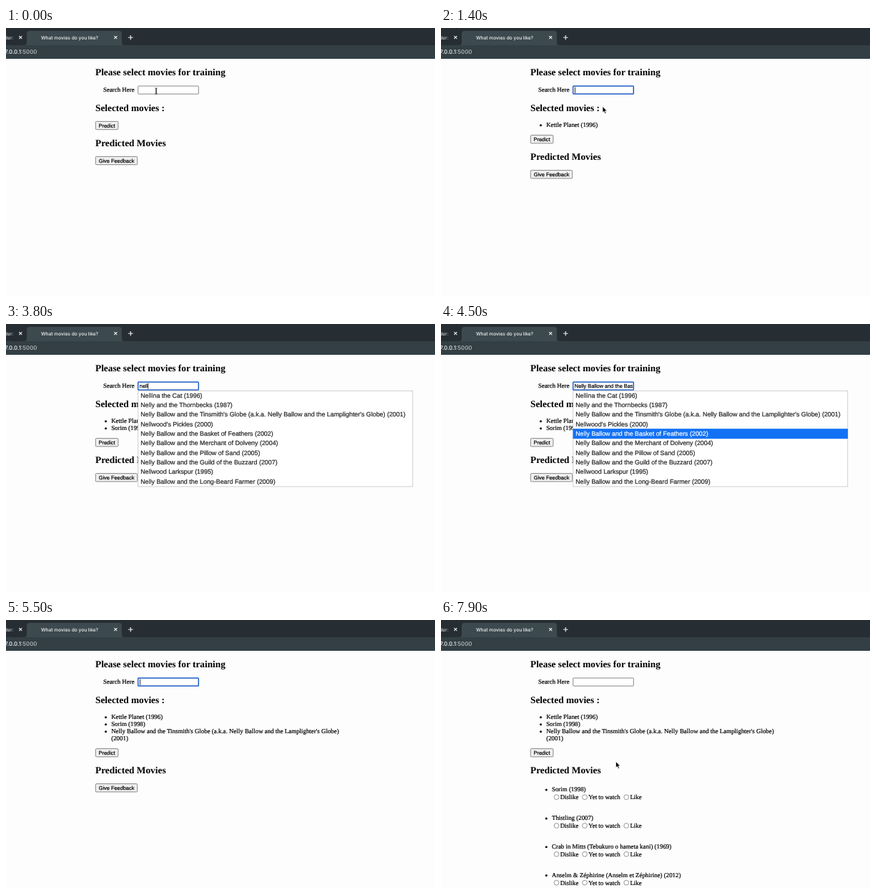
Animation, 600 px wide and 374 px high, one loop 8 s. Source, as an HTML page:

```html
<!DOCTYPE html>
<html lang="en">
<head>
<meta charset="utf-8">
<title>What movies do you like?</title>
<style>
  html, body { margin: 0; width: 100%; height: 100%; overflow: hidden; background: #fefdfe; }
  svg { display: block; width: 600px; height: 374px; text-rendering: geometricPrecision; }
  text { white-space: pre; fill: #000; stroke: #000; stroke-width: .2px; }
  .ui { font: 500 6.6px Inter, sans-serif; fill: #f4f6f6; stroke: none; }
  .url { font-size: 7.9px; }
  .h2 { font: bold 13.33px "Liberation Serif", serif; stroke: none; }
  .p { font: 8.89px "Liberation Serif", serif; }
  .field, .btn { font: 7.4px "Liberation Sans", sans-serif; }
  .btn { text-anchor: middle; }
  .row { font: 8.89px "Liberation Sans", sans-serif; fill: #222; stroke: #222; }
  .row.hot { fill: #fff; stroke: #fff; }
</style>
</head>
<body>
<svg viewBox="0 0 600 374">
  <clipPath id="clip"><rect x="186" y="82" width="82" height="10"/></clipPath>
  <rect width="600" height="374" fill="#fefdfe"/>
  <rect width="600" height="24" fill="#262e33"/>
  <path d="M26 24Q29 23 29 20V8Q29 4 33 4H158Q162 4 162 8V20Q162 23 165 24Z" fill="#3c494f"/>
  <rect y="24" width="600" height="19" fill="#333f44"/>
  <text class="ui" x="10.5" y="15.6" text-anchor="end" fill-opacity=".8">der:</text>
  <text class="ui" x="49" y="15.6">What movies do you like?</text>
  <path d="M18.3 11.2l4 4m0-4l-4 4M151.3 11.2l4 4m0-4l-4 4M171 13.3h6.6m-3.3-3.3v6.6" stroke="#eef1f1" stroke-width="1.1" fill="none"/>
  <text class="ui url" x="43.4" y="35.6" text-anchor="end">127.0.0.1<tspan fill="#b9c0c3">:5000</tspan></text>
  <text class="h2" x="125" y="66.4">Please select movies for training</text>
  <text class="p" x="136" y="89.2">Search Here</text>
  <text class="h2" x="125" y="115.8">Selected movies :</text>
  <g id="page"></g>
</svg>
<script>
const LOOP = 8000, STEP = 100;
const page = document.getElementById("page");
const pen = document.createElement("canvas").getContext("2d");
pen.font = '7.4px "Liberation Sans", sans-serif';

const globe = "Nelly Ballow and the Tinsmith's Globe (a.k.a. Nelly Ballow and the Lamplighter's Globe)";
const menus = {
  kettle: { width: 131, rows: [
    "Kettle Moon (1989)", "Kettle Planet (1996)", "Kettleby Tower (2001)", "The Last Kettle (1958)",
    "Kettle and Crumb (1977)", "The Kettle on the Hillock (1974)", "Kettledown (2008)",
    "Two Kettles Later (1993)", "My Uncle's Kettle (1985)", "Kettlefoot (2011)"] },
  sorim: { width: 177, rows: [
    "Sorim (1998)", "Sorim II (2004)", "Mark Sorimer: Off To Lunch (2012)",
    "Mark Sorimer: The Rooftop Guest (2015)"] },
  nell: { width: 384, rows: [
    "Nellina the Cat (1996)", "Nelly and the Thornbecks (1987)", globe + " (2001)",
    "Nellwood's Pickles (2000)", "Nelly Ballow and the Basket of Feathers (2002)",
    "Nelly Ballow and the Merchant of Dolveny (2004)", "Nelly Ballow and the Pillow of Sand (2005)",
    "Nelly Ballow and the Guild of the Buzzard (2007)", "Nellwood Larkspur (1995)",
    "Nelly Ballow and the Long-Beard Farmer (2009)"] }
};
const chosen = ["Kettle Planet (1996)", "Sorim (1998)", globe, "(2001)"];
const predicted = ["Sorim (1998)", "Thistling (2007)",
  "Crab in Mitts (Tebukuro o hameta kani) (1969)",
  "Anselm &amp; Zéphirine (Anselm et Zéphirine) (2012)"];

// Each entry changes part of the state from its time on.
const type = (word, start) => [...word].map((_, i) => [start + i * STEP, { value: word.slice(0, i + 1), caret: true }]);
const pick = (time, lines) => [time, { menu: null, hot: 0, value: "", caret: true, lines }];
const walk = (start, rows) => rows.map((hot, i) =>
  [start + i * STEP, { hot, value: menus.nell.rows[hot - 1] }]);

const script = [
  [0, { value: "", lines: 0, hot: 0 }],
  [300, { focus: true, caret: true }],
  ...type("kettl", 400),
  [1000, { menu: "kettle" }], [1200, { hot: 2 }],
  pick(1400, 1),
  [1700, { caret: false }],
  ...type("sorim", 1900),
  [2500, { menu: "sorim" }], [2600, { hot: 1 }],
  pick(3100, 2),
  ...type("nell", 3300),
  [3700, { menu: "nell" }],
  ...walk(4100, [1, 2, 3, 4, 5, 6, 4, 3, 2, 1, 2, 3]),
  pick(5400, 4),
  [5900, { caret: false }],
  [6000, { hover: true }],
  [6300, { focus: false }],
  [6400, { hover: false }],
  [7900, { results: true }]
];

// Pointer: time, x, y, shape. An entry without a shape hides it.
const track = [
  [0, 210, 88, "beam"], [200, 206, 87, "beam"], [400],
  [1100, 212, 97, "hand"], [1300, 226, 110, "hand"], [1400, 226, 109.5, "arrow"], [1500],
  [2300, 230.5, 96, "arrow"], [2500, 232, 98, "hand"], [2900, 236.5, 101.5, "hand"],
  [3100, 236.5, 101.5, "arrow"], [3300],
  [5600, 236.5, 101.5, "arrow"], [6000, 144, 184, "arrow"], [6200, 142, 183, "arrow"],
  [6300, 142, 183, "arrow"], [6600, 244.5, 197.5, "arrow"], [LOOP, 244.5, 197.5, "arrow"]
];
const shapes = {
  beam: `<path d="M-1.6 -4.2Q0 -4.2 0 -3V3Q0 4.2 -1.6 4.2M1.6 -4.2Q0 -4.2 0 -3V3Q0 4.2 1.6 4.2" fill="none" stroke="#222" stroke-width=".9"/>`,
  arrow: `<path d="M0 0V8.6L2 6.8L3.4 10L4.9 9.3L3.5 6.3H6.2Z" fill="#000" stroke="#fff" stroke-width=".7"/>`,
  hand: `<path d="M-1 0Q0 -1 1 0V3.4L4.6 4.4Q5.4 4.8 5.2 6L4.4 10H-.8L-3.4 6.4Q-3.4 5 -2.2 5.2L-1 6.2Z" fill="#fff" stroke="#111" stroke-width=".8"/>`
};

const text = (cls, x, y, s) => `<text class="${cls}" x="${x}" y="${y}">${s}</text>`;
const bullet = (x, y, s) => `<circle cx="${x - 7.7}" cy="${y - 2.3}" r="1.5"/>` + text("p", x, y, s);

function button(y, width, label, fill = "#efefef") {
  return `<rect x="125.3" y="${y}" width="${width}" height="11.3" rx="1.2" fill="${fill}" stroke="#6e6e6e" stroke-width=".8"/>` +
    text("btn", 125.3 + width / 2, y + 8.3, label);
}

function input({ value, focus, caret }) {
  const end = 187 + pen.measureText(value).width;
  const edge = focus ? 'stroke="#1f5fc4" stroke-width="1.5"' : 'stroke="#6e6e6e" stroke-width=".8"';
  return `<rect x="184.7" y="81" width="84.6" height="11.1" rx=".8" fill="#fff" ${edge}/>` +
    `<g clip-path="url(#clip)">${text("field", 186.8, 89.2, value)}` +
    (focus && caret ? `<rect x="${end}" y="82.5" width=".8" height="8.4"/>` : "") + "</g>";
}

function dropdown({ menu, hot }) {
  if (!menu) return "";
  const { width, rows } = menus[menu], pitch = 13.333;
  return `<rect x="184.8" y="93.2" width="${width}" height="${rows.length * pitch + .4}" fill="#fff" stroke="#bcbcbc" stroke-width=".7"/>` +
    rows.map((s, i) => {
      const on = i + 1 === hot;
      const bar = on ? `<rect x="184.5" y="${92.8 + i * pitch}" width="${width + .6}" height="14" fill="#1372f4"/>` : "";
      return bar + text(on ? "row hot" : "row", 188.2, 102.8 + i * pitch, s);
    }).join("");
}

function prediction(title, i) {
  const y = 239.4 + i * 39.8;
  const radios = [[161.5, "Dislike"], [201, "Yet to watch"], [259.2, "Like"]];
  return bullet(155, y, title) + radios.map(([x, s]) =>
    `<circle cx="${x}" cy="${y + 7.8}" r="3.4" fill="#fff" stroke="#6e6e6e" stroke-width=".7"/>` +
    text("p", x + 5.2, y + 10.8, s)).join("");
}

function pointer(t) {
  const i = track.findLastIndex(k => k[0] <= t);
  const [t0, x0, y0, shape] = track[i];
  if (!shape) return "";
  const next = track[i + 1];
  const [t1, x1, y1] = next[3] ? next : [next[0], x0, y0];
  const k = (t - t0) / (t1 - t0);
  return `<g transform="translate(${x0 + (x1 - x0) * k} ${y0 + (y1 - y0) * k})">${shapes[shape]}</g>`;
}

function draw(t) {
  const s = Object.assign({}, ...script.filter(([at]) => at <= t).map(([, change]) => change));
  const shift = s.lines ? 9.2 + 10 * s.lines : 0;
  const list = chosen.slice(0, s.lines).map((line, i) =>
    i === 3 ? text("p", 147.2, 168, line) : bullet(147.2, 138 + i * 10, line)).join("");
  page.innerHTML = input(s) + list +
    button(130.4 + shift, 31.6, "Predict", s.hover ? "#dedede" : undefined) +
    text("h2", 125, 165.2 + shift, "Predicted Movies") +
    (s.results ? predicted.map(prediction).join("") : button(179.4 + shift, 58.4, "Give Feedback")) +
    dropdown(s) + pointer(t);
}

let shown = -1;
const start = performance.now();
function tick() {
  const t = Math.floor((performance.now() - start) % LOOP / STEP) * STEP;
  if (t !== shown) draw(shown = t);
  requestAnimationFrame(tick);
}
tick();
</script>
</body>
</html>
```
